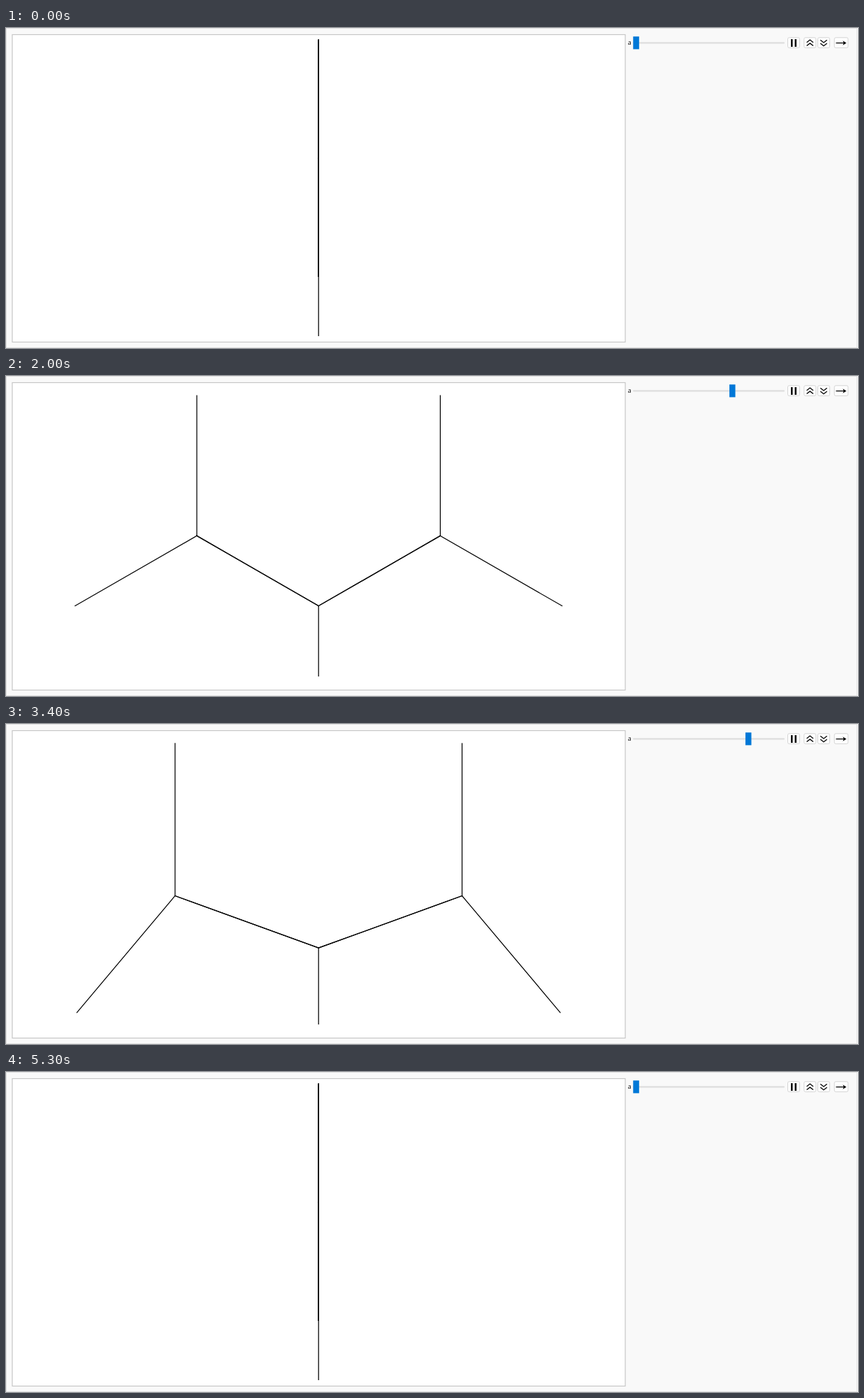
An HTML page for the animation above (6 s loop, 1219x459 px).

```html
<!DOCTYPE html>
<html lang="en">
<head>
<meta charset="utf-8">
<title>Branching tree</title>
<style>
  html, body { margin: 0; width: 100%; height: 100%; overflow: hidden; background: #f9f9f9; }
  svg { display: block; }
</style>
</head>
<body>
<svg width="1219" height="459" viewBox="0 0 1219 459">
  <rect width="1219" height="459" fill="#fff"/>
  <rect x="0.5" y="0.5" width="1217" height="458" fill="#f9f9f9" stroke="#e2e2e2"/>
  <rect x="9" y="9.5" width="877" height="441" fill="#fff" stroke="#c6c6c6" stroke-width="1.2"/>
  <g id="tree" stroke="#000" stroke-width="1.25" stroke-linecap="square"></g>

  <text x="889.8" y="24.3" font-family="'Open Sans', 'Noto Sans', sans-serif" font-size="8.6">a</text>
  <rect x="897" y="20.3" width="217" height="2.2" rx="1" fill="#dedede"/>
  <rect id="thumb" x="897.3" y="12.2" width="8.5" height="18.2" fill="#0078d7"/>

  <g fill="#fff" stroke="#d4d4d4">
    <rect x="1118.5" y="13.8" width="17" height="14.5" rx="2"/>
    <rect x="1141.8" y="13.8" width="17" height="14.5" rx="2"/>
    <rect x="1161.5" y="13.8" width="17" height="14.5" rx="2"/>
    <rect x="1185.2" y="13.8" width="19.6" height="14.5" rx="2"/>
  </g>
  <path d="M1123 16h2.5v11h-2.5zM1128.5 16h2.5v11h-2.5z"/>
  <g fill="none" stroke="#000" stroke-width="1.3">
    <path d="M1145.6 20.8l4.7-3.7l4.7 3.7M1145.6 25.6l4.7-3.7l4.7 3.7"/>
    <path d="M1165.2 17.2l4.7 3.7l4.7-3.7M1165.2 22l4.7 3.7l4.7-3.7"/>
    <path d="M1187.5 21.5h11"/>
  </g>
  <path d="M1202.4 21.5l-5.2-3.2l1.3 3.2l-1.3 3.2z"/>
</svg>
<script>
const LOOP = 6000, LAST = 9;
const CX = 447.2, CY = 229.2;
const STEP_TIMES = [700, 1000, 1200, 1500, 1800, 2000, 2300, 2600, 2900,
                    3100, 3400, 3700, 4000, 4200, 4500, 4800, 5000, 5300];
const tree = document.getElementById('tree');
const thumb = document.getElementById('thumb');

// One trunk, two branches drawn twice, four twigs
const lines = Array.from({ length: 9 }, () =>
  tree.appendChild(document.createElementNS('http://www.w3.org/2000/svg', 'line')));

// Segments in trunk lengths, y pointing up from the trunk's foot
function segments(angle) {
  const list = [[0, 0, 0, 1]];
  for (const side of [-1, 1]) {
    const x = 2 * side * Math.sin(angle);
    const y = 1 + 2 * Math.cos(angle);
    const branch = [0, 1, x, y];
    list.push(branch, branch, [x, y, x, y + 2],
      [x, y, x + 2 * side * Math.sin(2 * angle), y + 2 * Math.cos(2 * angle)]);
  }
  return list;
}

function drawTree(step) {
  const segs = segments(step * Math.PI / 18);
  const xs = segs.flatMap(s => [s[0], s[2]]);
  const ys = segs.flatMap(s => [s[1], s[3]]);
  const width = 2 * Math.max(...xs);
  const low = Math.min(...ys), high = Math.max(...ys);
  const height = high - low;
  // Upright and level trees get a fixed height, the others padding by width
  const scale = step % LAST === 0 ? 424.1 / height : 431.3 / (height + 0.0417 * width);
  const px = x => CX + x * scale;
  const py = y => CY + ((low + high) / 2 - y) * scale;
  segs.forEach(([x1, y1, x2, y2], i) => {
    const ends = { x1: px(x1), y1: py(y1), x2: px(x2), y2: py(y2) };
    for (const key in ends) lines[i].setAttribute(key, ends[key].toFixed(3));
  });
}

let shown = -1;
function render(time) {
  const count = STEP_TIMES.filter(t => t <= time).length;
  const step = LAST - Math.abs(LAST - count);
  if (step === shown) return;
  shown = step;
  drawTree(step);
  thumb.setAttribute('x', 897.3 + 22.95 * step);
}

const start = performance.now();
function frame() {
  render((performance.now() - start) % LOOP);
  requestAnimationFrame(frame);
}
frame();
</script>
</body>
</html>
```
